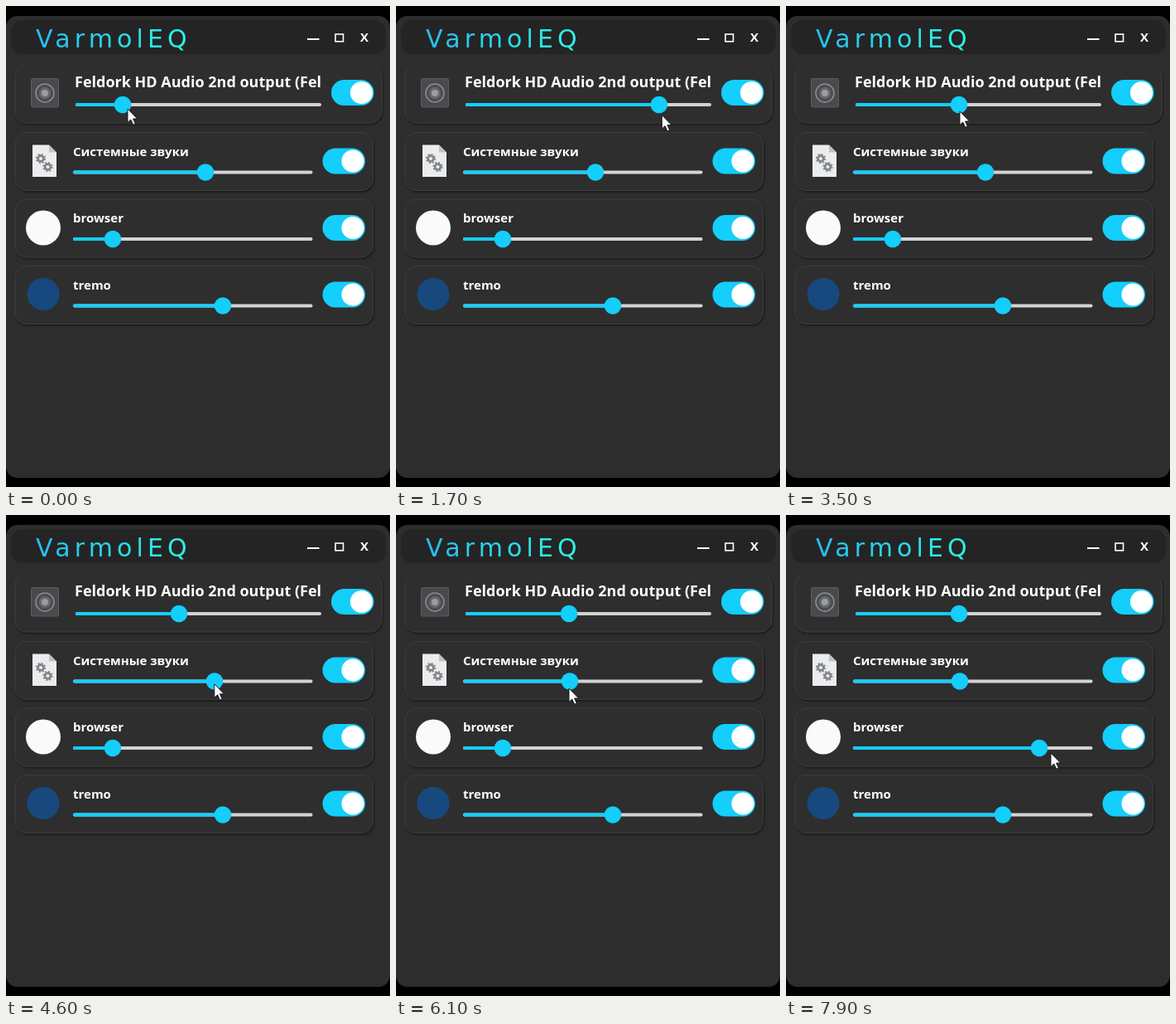
Animation, 464 px wide and 580 px high, one loop 8000 ms. Source, as an HTML page:

```html
<!DOCTYPE html>
<html lang="ru">
<head>
<meta charset="utf-8">
<title>VarmolEQ</title>
<style>
  html, body { margin: 0; width: 100%; height: 100%; overflow: hidden; background: #000; }
  svg { display: block; width: 464px; height: 580px; }
  text { font: 700 15px "Open Sans", "Noto Sans", sans-serif; fill: #fff; }
  .big { font-size: 18px; }
  .brand { font: 400 30px "DejaVu Sans", sans-serif; letter-spacing: 5.1px; fill: url(#cyan); }
  .window, .card { fill: #2d2d2d; }
  .card { stroke: #3d3d3d; filter: url(#shade); }
  .rail, .level { stroke-width: 4; stroke-linecap: round; }
  .rail { stroke: #d3d3d3; }
  .level { stroke: #14cefb; }
  .thumb, .switch { fill: #14cefb; }
</style>
</head>
<body>
<svg viewBox="0 0 464 580">
  <defs>
    <linearGradient id="cyan" gradientUnits="userSpaceOnUse" x1="37" y1="0" x2="222" y2="0">
      <stop offset="0" stop-color="#28bcee"/>
      <stop offset="1" stop-color="#2cf4e4"/>
    </linearGradient>
    <filter id="shade" x="-5%" y="-20%" width="110%" height="140%">
      <feDropShadow dx="1" dy="1.5" stdDeviation="1.2" flood-color="#000" flood-opacity=".5"/>
    </filter>
    <clipPath id="list"><rect y="72" width="464" height="490"/></clipPath>
    <clipPath id="label"><rect x="80" y="76" width="301" height="32"/></clipPath>
    <g id="gear" fill="none" stroke="#7d858d">
      <circle r="3.4" stroke-width="2.6"/>
      <circle r="5.2" stroke-width="1.8" stroke-dasharray="2.04 2.04"/>
    </g>
  </defs>

  <rect class="window" y="12" width="464" height="557" rx="14"/>
  <rect x="6" y="17" width="453" height="41" rx="14" fill="#242424"/>
  <text class="brand" x="36" y="50">VarmolEQ</text>
  <path d="M364 40h14.5" stroke="#fff" stroke-width="2"/>
  <rect x="398" y="34" width="9.500" height="8.800" fill="none" stroke="#fff" stroke-width="1.600"/>
  <text x="428" y="43">X</text>

  <g id="cards" clip-path="url(#list)"></g>

  <g id="speaker">
    <rect x="30.500" y="87.500" width="33" height="34.500" rx="2" fill="#4a4a4e" stroke="#5c5c60"/>
    <circle cx="47" cy="105" r="11" fill="#4c4d51" stroke="#8c8d92" stroke-width="1.500"/>
    <circle cx="47" cy="105" r="7" fill="#68696e"/>
    <circle cx="47" cy="105" r="4" fill="#9a9da6"/>
  </g>
  <g id="file">
    <path d="M32 167.500h20l9 9v29.500h-29z" fill="#ececec"/>
    <path d="M52 167.500v9h9z" fill="#bfc3c6"/>
    <use href="#gear" x="42" y="184"/>
    <use href="#gear" x="50.500" y="194"/>
  </g>
  <circle cx="45" cy="267.500" r="21" fill="#fafafa"/>
  <circle cx="45" cy="347.500" r="19.500" fill="#17497f"/>

  <path id="cursor" d="M0 0V16.500L3.800 13L6.600 19.200L9.300 18L6.600 12H11.600Z"
        fill="#fff" stroke="#111" stroke-width=".9" stroke-linejoin="round"/>
</svg>
<script>
  const LOOP = 8000, STEP = 100;

  const rows = [
    { name: 'Feldork HD Audio 2nd output (Feldork)', level: 141, big: true },
    { name: 'Системные звуки', level: 241 },
    { name: 'browser', level: 129 },
    { name: 'tremo', level: 262 }
  ];

  // Pointer moves in order; those with a row also drag its slider to `level`.
  const home = [147, 124];
  const moves = [
    { from: 600, to: 1900, tip: [353, 133], row: 0, level: 350 },
    { from: 2000, to: 3400, tip: [210, 127], row: 0, level: 209 },
    { from: 3500, to: 3800, tip: [211, 156] },
    { from: 3800, to: 4300, tip: [241, 203] },
    { from: 4300, to: 5400, tip: [317, 209], row: 1, level: 318, ease: 1.5 },
    { from: 5500, to: 6100, tip: [209, 209], row: 1, level: 210 },
    { from: 6100, to: 6400, tip: [159, 262] },
    { from: 6400, to: 6900, tip: [139, 277] },
    { from: 7000, to: 7900, tip: [320, 287], row: 2, level: 306, ease: 1.1 }
  ];

  const mix = (a, b, k) => a + (b - a) * k;
  const railStart = row => row.big ? 86 : 83;
  const railY = i => i ? 120 + 80.5 * i : 119;

  function card(row, i) {
    const y = railY(i), x = railStart(row);
    const top = row.big ? y - 48.5 : y - 48;
    const width = row.big ? 443 : 432.5;
    const knobY = row.big ? y - 14.5 : y - 13.5;
    const switchX = width - 50;
    const label = row.big
      ? `<g clip-path="url(#label)"><text class="big" x="83" y="98">${row.name}</text></g>`
      : `<text x="81" y="${y - 20}">${row.name}</text>`;
    return `
      <rect class="card" x="11" y="${top}" width="${width}" height="${y + 22 - top}" rx="14"/>
      ${label}
      <path class="rail" d="M${x} ${y}H${switchX - 14}"/>
      <path class="level"/>
      <circle class="thumb" cy="${y}" r="10.3"/>
      <rect class="switch" x="${switchX}" y="${knobY - 15.5}" width="51.5" height="31" rx="15.5"/>
      <circle cx="${switchX + 36.5}" cy="${knobY}" r="13.6" fill="#fff"/>`;
  }

  const cards = document.getElementById('cards');
  const cursor = document.getElementById('cursor');
  cards.innerHTML = rows.map(card).join('');
  const fills = cards.querySelectorAll('.level');
  const thumbs = cards.querySelectorAll('.thumb');

  function draw(ms) {
    const t = Math.floor(ms % LOOP / STEP) * STEP;
    const levels = rows.map(row => row.level);
    let [x, y] = home;

    for (const { from, to, tip, row, level, ease = 1 } of moves) {
      if (t <= from) break;
      const k = Math.min(1, (t - from) / (to - from)) ** ease;
      x = mix(x, tip[0], k);
      y = mix(y, tip[1], k);
      if (row !== undefined) levels[row] = mix(levels[row], level, k);
    }

    levels.forEach((level, i) => {
      fills[i].setAttribute('d', `M${railStart(rows[i])} ${railY(i)}H${level}`);
      thumbs[i].setAttribute('cx', level);
    });
    cursor.setAttribute('transform', `translate(${x} ${y})`);
  }

  const start = performance.now();
  function tick() {
    draw(performance.now() - start);
    requestAnimationFrame(tick);
  }
  tick();
</script>
</body>
</html>
```
